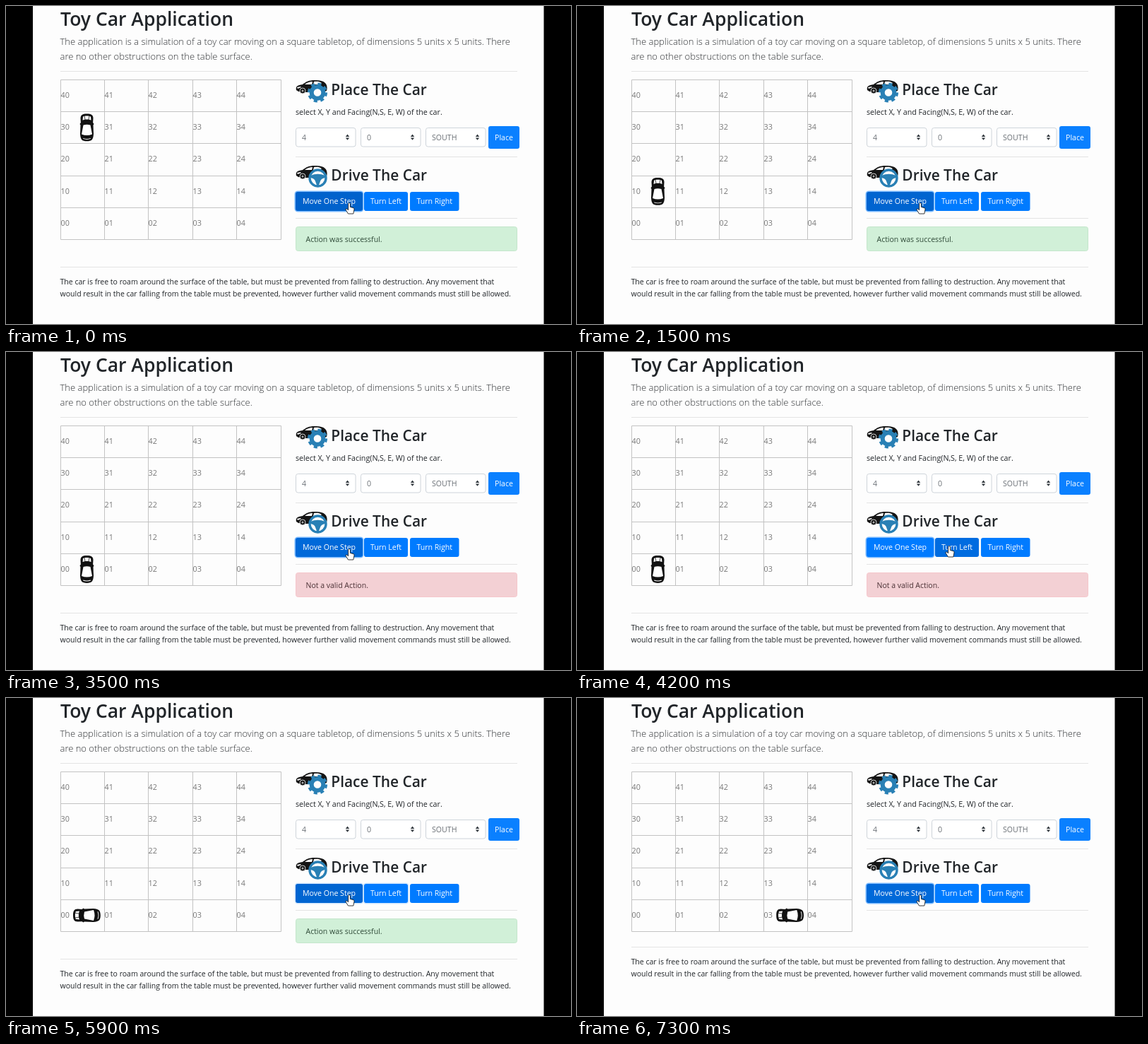
An HTML page that plays this animation: 800 by 450 pixels, repeating every 8 s.

```html
<!DOCTYPE html>
<html lang="en">
<head>
<meta charset="utf-8">
<title>Toy Car Application</title>
<style>
  html, body { margin: 0; width: 100%; height: 100%; overflow: hidden; background: #000; }
  svg { display: block; width: 800px; height: 450px; font: 10.6px "Open Sans", "Noto Sans", sans-serif; fill: #212529; }
  .head { font-weight: 600; }
  .title { font-size: 26.5px; }
  .sub { font-size: 20.9px; }
  .lead { font-size: 13px; font-weight: 300; fill: #303336; }
  .foot { font-size: 10.53px; }
  .cell { font-size: 10.8px; fill: #777; }
  .field { fill: #6a6f75; }
  .btn { fill: #fff; text-anchor: middle; }
  .rule { stroke: #e4e4e4; }
  .grid { stroke: #c3c3c3; fill: none; }
  .blue { fill: #007bff; }
  .ring { fill: none; stroke: #80bdff; stroke-width: 2; }
  .mark { fill: none; stroke: #2980b5; }
</style>
</head>
<body>
<svg viewBox="0 0 800 450">
  <defs>
    <g id="side">
      <path fill="#151515" d="M1 15C0 10 2 8 10 7C15 3 19 1 27 1C35 1 39 2 42 5C45 8 45 13 44 16L38 18H13L4 17Z"/>
      <path fill="#fdfdfd" d="M13 7C17 4 20 3 24 3L23 7ZM26 3C31 2.600 34 3 37 5L34 7H25ZM2 11L7 10L8 11L3 13Z"/>
      <circle cx="10" cy="16" r="4" fill="#151515" stroke="#fdfdfd" stroke-width=".8"/>
      <circle cx="10" cy="16" r="1.500" fill="#aaa"/>
    </g>
    <g id="top">
      <path fill="#111" d="M-9-13C-9-18-6-19.500 0-19.500S9-18 9-13L8.600-7L10-5L9-3.500L9.500 9C9 17 7 19.300 0 19.300S-9 17-9.500 9L-9-3.500L-10-5L-8.600-7Z"/>
      <path fill="#fff" d="M-5.500-15.500C-4-17 4-17 5.500-15.500L6-10.500C3-12-3-12-6-10.500ZM-5-3.500Q0-5 5-3.500L7.500 9.500Q0 12.500-7.500 9.500ZM-5.500 15.800Q0 18 5.500 15.800L5 15Q0 17-5 15Z"/>
      <path fill="none" stroke="#111" stroke-width=".8" d="M-3.500-17L-2.500-11M3.500-17L2.500-11"/>
    </g>
    <clipPath id="clip"><rect id="clipBox" x="410" y="312" width="314" height="35"/></clipPath>
  </defs>

  <rect x="38" width="723.500" height="450" fill="#fdfdfd"/>
  <text class="head title" x="77" y="28">Toy Car Application</text>
  <text class="lead" x="76.500" y="55">The application is a simulation of a toy car moving on a square tabletop, of dimensions 5 units x 5 units. There</text>
  <text class="lead" x="76.500" y="76">are no other obstructions on the table surface.</text>
  <path class="rule" d="M77 92.500H724M410 213.500H724M410 300.500H724"/>
  <g id="table"></g>

  <use href="#side" x="410" y="104"/>
  <g class="mark">
    <circle cx="441" cy="122.500" r="8.300" stroke-width="6" fill="#fdfdfd"/>
    <circle cx="441" cy="122.500" r="12" stroke-width="4.200" stroke-dasharray="5 4.425"/>
  </g>
  <text class="head sub" x="460.300" y="126">Place The Car</text>
  <text x="410" y="154" font-size="10.700">select X, Y and Facing(N,S, E, W) of the car.</text>
  <g id="fields"></g>
  <rect x="683" y="170" width="44" height="32" rx="3" fill="#0a80ff"/>
  <text class="btn" x="705" y="190">Place</text>

  <use href="#side" x="410" y="225"/>
  <g class="mark" stroke-width="3.400">
    <circle cx="441.500" cy="243.500" r="11.500" fill="#fdfdfd"/>
    <path fill="#2980b5" stroke="none" d="M431 240Q441.500 235.500 452 240V243Q446 244 445 248L442.800 254H440.200L438 248Q437 244 431 243Z"/>
  </g>
  <text class="head sub" x="460.300" y="247">Drive The Car</text>
  <g id="buttons"></g>

  <g id="alert" clip-path="url(#clip)">
    <rect id="alertBox" x="410.500" y="312.500" width="313" height="34" rx="3"/>
    <text id="alertText" x="424.500" font-size="10.500"></text>
  </g>
  <g id="footer">
    <path class="rule" d="M77 352.500H724"/>
    <text class="foot" x="76.500" y="377">The car is free to roam around the surface of the table, but must be prevented from falling to destruction. Any movement that</text>
    <text class="foot" x="76.500" y="394">would result in the car falling from the table must be prevented, however further valid movement commands must still be allowed.</text>
  </g>
  <use id="car" href="#top"/>
  <path id="hand" fill="#fff" stroke="#222" stroke-width=".9" stroke-linejoin="round" d="M-1.400 1Q0-1 1.400 1V6L6 7.200Q7.300 7.700 7 9.500L5.800 15.500H-1.500L-5 9.800Q-5.200 8-3.400 8.600L-1.400 10.200Z"/>
</svg>
<script>
const LOOP = 8000, FADE = 150, SLIDE = 480;
const $ = id => document.getElementById(id);
const set = (el, attrs) => { for (const k in attrs) el.setAttribute(k, attrs[k]); };
function add(parent, tag, attrs, text = '') {
  const el = document.createElementNS('http://www.w3.org/2000/svg', tag);
  set(el, attrs);
  el.textContent = text;
  return parent.appendChild(el);
}

const colX = c => Math.floor(77 + 62.45 * c) + 0.5;
const rowY = r => Math.round(104 + 45.2 * r) + 0.5;
let lines = '';
for (let i = 0; i < 6; i++)
  lines += `M${colX(0)} ${rowY(i)}H${colX(5)}M${colX(i)} ${rowY(0)}V${rowY(5)}`;
add($('table'), 'path', { class: 'grid', d: lines });
for (let r = 0; r < 5; r++)
  for (let c = 0; c < 5; c++)
    add($('table'), 'text', { class: 'cell', x: colX(c), y: rowY(r) + 25.5 }, `${4 - r}${c}`);

['4', '0', 'SOUTH'].forEach((label, i) => {
  const x = 410.5 + 92 * i, g = $('fields');
  add(g, 'rect', { x, y: 172.5, width: 84.5, height: 26.5, rx: 3, fill: '#fff', stroke: '#ced4da' });
  add(g, 'text', { class: 'field', x: x + 8.5, y: 190 }, label);
  const ax = x + 73;
  add(g, 'path', { fill: '#343a40', d: `M${ax - 2.7} 185L${ax} 181.600L${ax + 2.7} 185ZM${ax - 2.7} 186.400L${ax} 189.800L${ax + 2.7} 186.400Z` });
});

const [move, left] = [['Move One Step', 410, 95], ['Turn Left', 507, 62], ['Turn Right', 572, 69.5]].map(([label, x, w]) => {
  const g = $('buttons');
  const ring = add(g, 'rect', { class: 'ring', x: x - 0.6, y: 262.4, width: w + 1.2, height: 28.2, rx: 4, opacity: 0 });
  const box = add(g, 'rect', { class: 'blue', x, y: 263, width: w, height: 27, rx: 3 });
  add(g, 'text', { class: 'btn', x: x + w / 2, y: 280 }, label);
  return { ring, box };
});

// Button shades: 0 idle, 1 hover, 2 pressed
const shades = [[123, 255], [105, 217], [98, 204]];
const moveShade = [[0, 2], [150, 1], [740, 2], [1000, 1], [1400, 2], [1600, 1], [3000, 2], [3300, 1], [4000, 0],
  [5600, 1], [5805, 2], [6400, 1], [6900, 2], [7050, 1]];
const leftShade = [[0, 0], [4080, 1], [4720, 2], [4790, 1], [5480, 0]];
const moveRing = [[0, 1], [4720, 0], [5850, 1]];
const leftRing = [[0, 0], [4720, 1], [5805, 0]];
// time, column, row from the top, heading angle
const carSteps = [[0, 0, 1, 0], [200, 0, 2, 0], [1000, 0, 3, 0], [1600, 0, 4, 0], [4800, 0, 4, -90],
  [6200, 1, 4, -90], [6400, 2, 4, -90], [7000, 3, 4, -90]];
const good = ['Action was successful.', '#d1f0d8', '#c3e6cb', '#2f4a38'];
const bad = ['Not a valid Action.', '#f3d0d4', '#f5c6cb', '#4a3034'];
// shown at, slides up at, look
const alerts = [[0, 390, good], [960, 2970, good], [3460, 9000, bad], [4800, 6810, good]];

const clamp = v => Math.min(1, Math.max(0, v));
const swing = p => 0.5 - Math.cos(Math.PI * clamp(p)) / 2;
const last = (table, t) => table.findLastIndex(row => row[0] <= t);

function blend(table, t) {
  const i = last(table, t), to = table[i][1];
  const from = i ? table[i - 1][1] : to;
  return from + (to - from) * clamp((t - table[i][0]) / FADE);
}
function shade(level) {
  const i = Math.min(1, Math.floor(level)), f = level - i;
  const [g, b] = shades[i].map((v, k) => Math.round(v + (shades[i + 1][k] - v) * f));
  return `rgb(0,${g},${b})`;
}
function paint(btn, level, ring) {
  btn.box.style.fill = shade(level);
  set(btn.ring, { opacity: ring });
}
function drawAlert(t) {
  const [, hide, [text, fill, stroke, ink]] = alerts[last(alerts, t)];
  const open = 1 - swing((t - hide) / SLIDE);
  const h = 35 * open;
  set($('alert'), { visibility: open > 0.01 ? 'visible' : 'hidden' });
  set($('clipBox'), { height: h });
  set($('alertBox'), { height: Math.max(0, h - 1), fill, stroke });
  set($('alertText'), { y: 325 + 9 * open, fill: ink });
  $('alertText').textContent = text;
  // the page bottom follows the taller of table and side column
  const drop = Math.max(0, 46 * open - 29);
  set($('footer'), { transform: `translate(0 ${drop})` });
}
function draw(t) {
  paint(move, blend(moveShade, t), blend(moveRing, t));
  paint(left, blend(leftShade, t), blend(leftRing, t));
  drawAlert(t);
  const [, c, r, turn] = carSteps[last(carSteps, t)];
  set($('car'), { transform: `translate(${114.5 + 62.4 * c} ${126.8 + 45.2 * r}) rotate(${turn})` });
  const trip = swing((t - 3860) / 340) - swing((t - 5360) / 340);
  set($('hand'), { transform: `translate(${486 + 41 * trip} ${278.5 - 4 * trip})` });
}
function tick() {
  draw(performance.now() % LOOP);
  requestAnimationFrame(tick);
}
tick();
</script>
</body>
</html>
```
